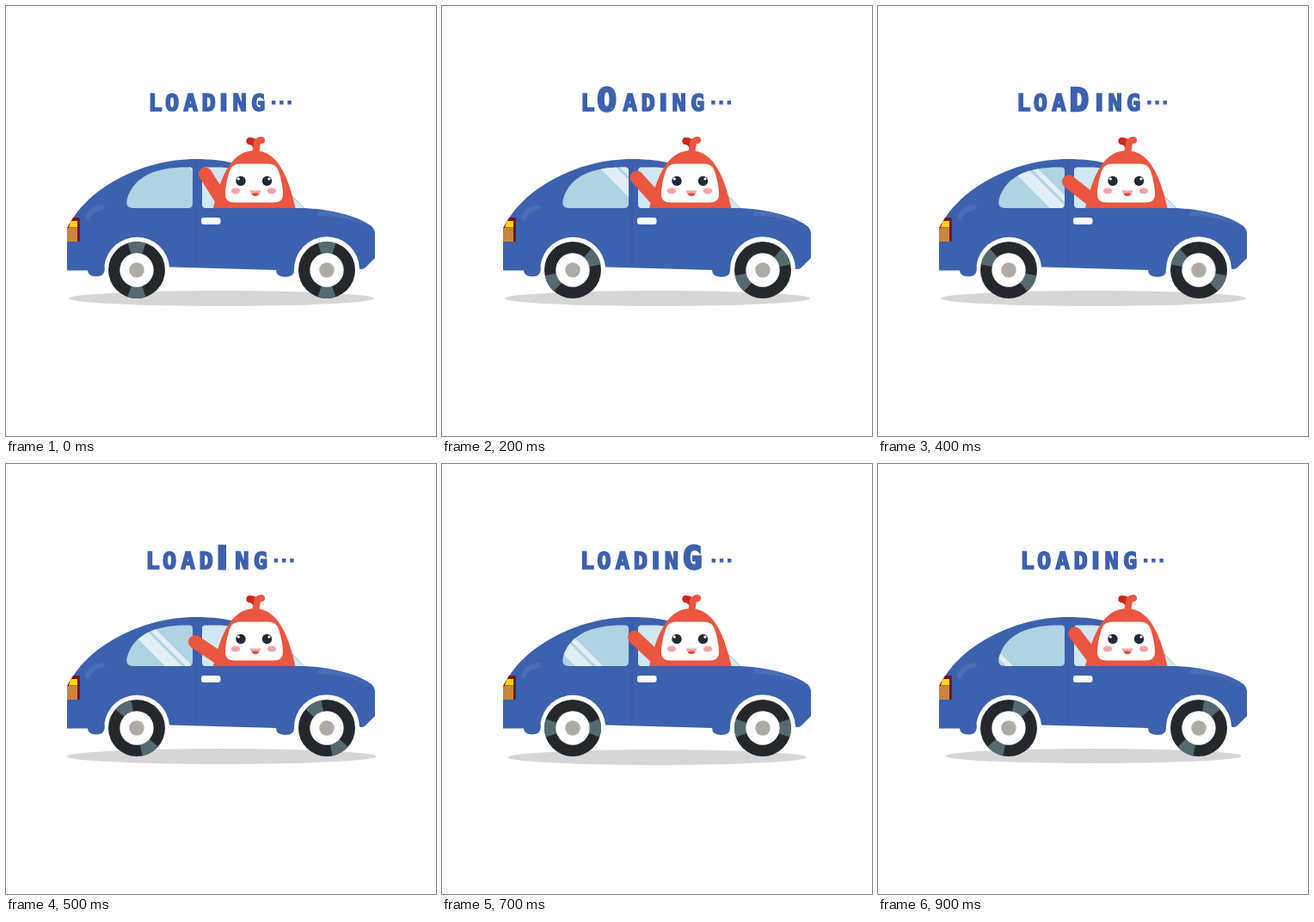
An HTML page for the animation above (1 s loop, 500x500 px).

```html
<!DOCTYPE html>
<html lang="en">
<head>
<meta charset="utf-8">
<title>Loading</title>
<style>
  html, body { margin: 0; width: 100%; height: 100%; overflow: hidden; background: #fff; }
  svg { display: block; width: 100vw; height: 100vh; }
  text { font: bold 27px "DejaVu Sans Mono", monospace; text-anchor: middle; stroke: #3c61ae; stroke-width: 1.7; }
  .sans { font-family: "DejaVu Sans", sans-serif; }
</style>
</head>
<body>
<svg viewBox="0 0 500 500">
  <defs>
    <clipPath id="rear">
      <path id="glass" d="M148 235H212Q217 235 217 230V191Q217 187.5 213 187.5C176 187 149 197 141 224Q138 235 148 235Z"/>
    </clipPath>
    <g id="wheel">
      <circle r="33" fill="#23282c"/>
      <path class="band" fill="#546a70" d="M0 0L-10.5 -31.3A33 33 0 0 1 10.5 -31.3L-10.5 31.3A33 33 0 0 0 10.5 31.3Z"/>
      <circle r="19.7" fill="#fff"/>
      <circle r="8.7" fill="#aeaaa4"/>
    </g>
  </defs>

  <ellipse id="shadow" cx="250.5" fill="#d6d6d6"/>

  <!-- car body -->
  <path fill="#3c61ae" d="M71 307.5V262L78 247C98 214 154 178 221 178C240 178 256 180 270 184
    C300 192 325 212 347 235C385 237 411 246 425 256Q429 260 429 265V293L418 304Q415 307 411 305.5
    A38 38 0 0 0 335 307Q335 315 325 315Q314 315 314 307L190 303.5A38 38 0 0 0 114.5 301.5
    C116 311 112 314.5 105 314.5S95 311 95 307.5Z"/>
  <path fill="#4a6db6" d="M361 244L365 238C387 239 406 246 419 256C400 247 385 244 361 244Z"/>
  <path d="M95 246Q98 236 112 234" fill="none" stroke="#4a6db6" stroke-width="6" stroke-linecap="round"/>
  <path d="M221 183V303" stroke="#3658a2"/>
  <path fill="#7a1220" d="M78 246H84Q86 246 86 248V272Q86 274 84 274H71V258Z"/>
  <path fill="#fcd808" d="M75.5 250H83V257.5H73Z"/>
  <path fill="#c98440" d="M71 258H83V274H71Z"/>

  <!-- windows -->
  <use href="#glass" fill="#afd3e2"/>
  <g clip-path="url(#rear)">
    <g id="shine" fill="#e2eef5">
      <path d="M-28 0H-8L242 250H222Z"/>
      <path d="M-4 0H4L254 250H246Z"/>
    </g>
  </g>
  <path fill="#d0e8f2" d="M232 187.5H250C290 190 325 212 347 235H232Q228 235 228 231V191Q228 187.5 232 187.5Z"/>
  <rect x="227" y="246" width="22.5" height="8" rx="3" fill="#fff"/>

  <!-- driver -->
  <path d="M283.5 157Q288 157 290 161" fill="none" stroke="#c8281d" stroke-width="8.5" stroke-linecap="round"/>
  <path d="M290 170C293 163 289 157 297 156" fill="none" stroke="#eb5640" stroke-width="8" stroke-linecap="round"/>
  <g id="arm">
    <path d="M253 229H213" stroke="#eb5640" stroke-width="15.5"/>
    <circle cx="213" cy="229" r="7.75" fill="#eb5640"/>
  </g>
  <path fill="#eb5640" d="M241 235C248 206 259 168 289 168S329.5 206 336.5 235Z"/>
  <path fill="#fff" d="M272 183.5H305Q314.500 183.500 317 192Q322 207 322 219Q322 228.500 311 228.500H266
    Q255 228.500 255 219Q255 207 260 192Q262.500 183.500 272 183.500Z"/>
  <g fill="#222a35"><circle cx="273" cy="203.5" r="5.7"/><circle cx="303.5" cy="203.5" r="5.7"/></g>
  <g fill="#fff"><circle cx="270.3" cy="201" r="1.6"/><circle cx="306" cy="201" r="1.6"/></g>
  <g fill="#f4a3ab"><ellipse cx="267" cy="215" rx="5.2" ry="3.5"/><ellipse cx="309" cy="215" rx="5.2" ry="3.5"/></g>
  <path fill="#f7a5ab" d="M283.5 214.5H296.5Q295 220.5 290 220.5T283.5 214.5Z"/>
  <path fill="#e2483b" d="M285.5 218.5Q290 216.5 294.5 218.5Q293 221 290 221T285.5 218.5Z"/>

  <use href="#wheel" x="152" y="307"/>
  <use href="#wheel" x="373" y="307"/>

  <g id="word" fill="#3c61ae" role="img" aria-label="Loading">
    <g><text x="4.5" y="-.6">L</text></g>
    <g><text x="7" y="-.6">O</text></g>
    <g><text x="7.5" y="-.6">A</text></g>
    <g><text x="6.500" y="-.6">D</text></g>
    <g><text x="3" y="-.6" class="sans">I</text></g>
    <g><text x="7.5" y="-.6">N</text></g>
    <g><text x="7" y="-.6">G</text></g>
    <g><path d="M0 -12.5h4.4v4.4h-4.4zm9.2 0h4.4v4.4h-4.4zm9.2 0h4.4v4.4h-4.4z"/></g>
  </g>
</svg>
<script>
const $ = id => document.getElementById(id);
const letters = [...$('word').children];
const advance = [17, 21, 22, 21, 14, 22, 23, 26];
const band = document.querySelector('.band');
// radius and height of the shadow on odd steps
const bounce = [[172, 339.5], [173.5, 341], [180, 340], [173.5, 341], [172, 339.5]];

function layout(active) {
  let x = 169 - (advance[active] || 0) * 0.2;
  letters.forEach((el, i) => {
    const scale = i === active ? 1.4 : 1;
    el.setAttribute('transform', `translate(${x} 122.5) scale(${scale})`);
    x += advance[i] * scale;
  });
}

function draw(step) {
  const swing = 5 - Math.abs(5 - step);
  layout(step - 1);
  band.setAttribute('transform', `rotate(${swing * 30})`);
  $('arm').setAttribute('transform', `rotate(${57.7 - swing * 4.8} 253 229)`);
  $('shine').setAttribute('transform', `translate(${53 - step * 15} 0)`);
  const [rx, cy] = step % 2 ? bounce[step >> 1] : [177.5, 340];
  $('shadow').setAttribute('rx', rx);
  $('shadow').setAttribute('ry', rx < 173 ? 8.5 : 9);
  $('shadow').setAttribute('cy', cy);
}

const start = performance.now();
function tick() {
  draw(Math.floor((performance.now() - start) / 100) % 10);
  requestAnimationFrame(tick);
}
tick();
</script>
</body>
</html>
```
